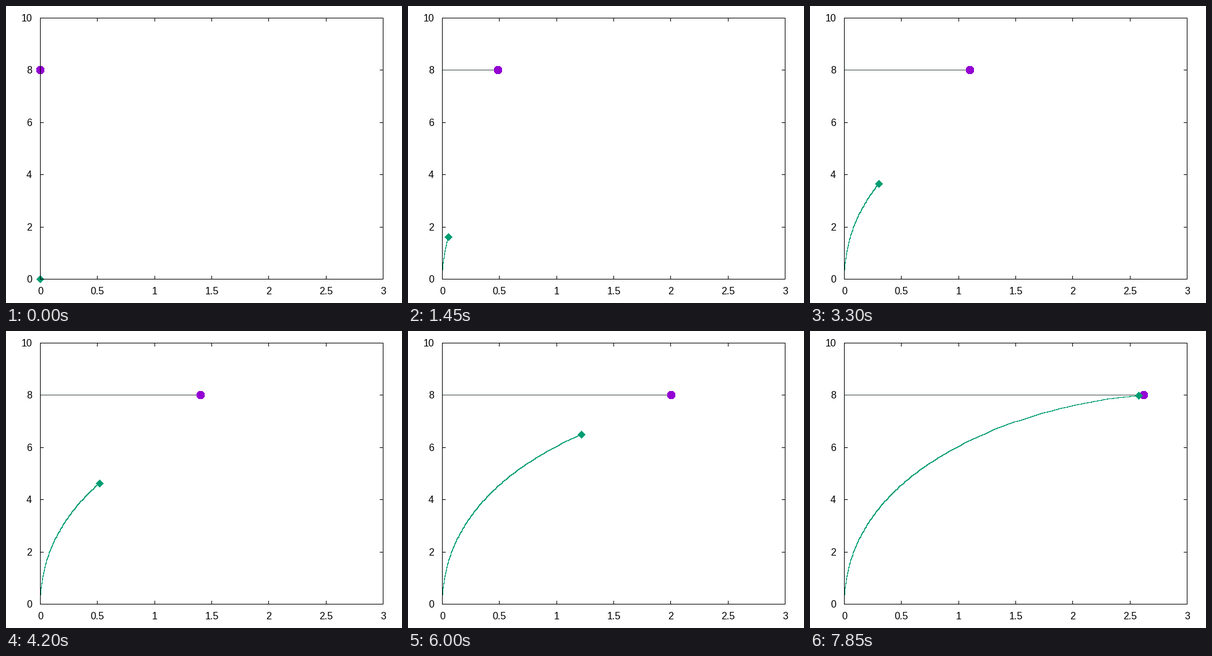
Animation, 640 px wide and 480 px high, one loop 7.9 s. Source, as a matplotlib script:

```python
import numpy as np
import matplotlib.pyplot as plt
from matplotlib.animation import FuncAnimation
from matplotlib.patches import Circle, Polygon, Rectangle

plt.rcParams["font.family"] = "Liberation Sans"
plt.rcParams["path.simplify"] = False

W, H, DPI = 640, 480, 100
PX = 72 / DPI  # one pixel in points
LEFT, RIGHT, TOP, BOTTOM = 55, 609, 19, 441
FRAMES, INTERVAL = 158, 50
PURPLE, GREEN, TRAIL = "#9400d3", "#009e73", "#3f5048"

HEIGHT = 8.0   # level of the runner
RATIO = 0.3    # runner speed / chaser speed


def to_px(x, y):
    """Data coordinates to whole pixels."""
    px = LEFT + np.floor(np.asarray(x) * (RIGHT - LEFT) / 3 + 0.5)
    py = BOTTOM - np.floor(np.asarray(y) * (BOTTOM - TOP) / 10 + 0.5)
    return px, py


def pursuit(t):
    """Closed-form pursuit curve; w is the remaining share of the height."""
    w = np.linspace(1, 0, 40001) ** 2
    a = w ** (1 + RATIO) / (1 + RATIO)
    b = w ** (1 - RATIO) / (1 - RATIO)
    x = HEIGHT * ((a - b) / 2 + RATIO / (1 - RATIO ** 2))
    time = RATIO * HEIGHT * (1 / (1 - RATIO ** 2) - (a + b) / 2)
    return np.interp(t, time, x), np.interp(t, time, HEIGHT * (1 - w))


def chain(px, py):
    """Pixel centres along a polyline of whole-pixel vertices."""
    xs, ys = [px[:1]], [py[:1]]
    for i in range(len(px) - 1):
        dx, dy = px[i + 1] - px[i], py[i + 1] - py[i]
        n = int(max(abs(dx), abs(dy)))
        if n:
            s = np.arange(1, n + 1) / n
            xs.append(np.floor(px[i] + dx * s + 0.5))
            ys.append(np.floor(py[i] + dy * s + 0.5))
    return np.concatenate(xs) + 0.5, np.concatenate(ys) + 0.5


fig = plt.figure(figsize=(W / DPI, H / DPI), dpi=DPI, facecolor="white")
ax = fig.add_axes([0, 0, 1, 1])
ax.set_xlim(0, W)
ax.set_ylim(H, 0)
ax.axis("off")


def line(xs, ys, color, z):
    return ax.plot(xs, ys, color=color, lw=PX, antialiased=False,
                   snap=False, zorder=z)[0]


def tick(x, y, dx, dy):
    line([x + 0.5, x + dx + 0.5], [y + 0.5, y + dy + 0.5], "black", 1)


def label(x, y, value, align):
    ax.text(x, y, f"{value:g}", ha=align, va="baseline", fontsize=16 * PX)


for v in np.arange(0, 3.1, 0.5):
    x = to_px(v, 0)[0]
    tick(x, BOTTOM, 0, -5)
    tick(x, TOP, 0, 5)
    label(x + 0.5, 466, v, "center")
for v in range(0, 11, 2):
    y = to_px(0, v)[1]
    tick(LEFT, y, 5, 0)
    tick(RIGHT, y, -5, 0)
    label(42, y + 6, v, "right")

ax.add_patch(Rectangle((LEFT + 0.5, TOP + 0.5), RIGHT - LEFT, BOTTOM - TOP,
                       fill=False, ec="black", lw=PX, antialiased=False,
                       snap=False, zorder=6))

times = (np.arange(FRAMES) + 0.1) / 60
run_x, run_y = to_px(times, np.full(FRAMES, HEIGHT))
chase_x, chase_y = to_px(*pursuit(times))

run_trail = line([], [], TRAIL, 2)
chase_trail = line([], [], GREEN, 3)
dot = ax.add_patch(Circle((0, 0), 6.3, fc=PURPLE, lw=0,
                          antialiased=False, zorder=4))
diamond = ax.add_patch(Polygon([(0, 0), (1, 0), (0, 1)], fc=GREEN, lw=0,
                               antialiased=False, snap=False, zorder=5))
CORNERS = 5.8 * np.array([(1, 0), (0, 1), (-1, 0), (0, -1)])


def update(i):
    n = i + 1
    run_trail.set_data(*chain(run_x[:n], run_y[:n]))
    chase_trail.set_data(*chain(chase_x[:n], chase_y[:n]))
    dot.center = run_x[i] + 0.5, run_y[i] + 0.5
    diamond.set_xy(CORNERS + (chase_x[i] + 0.5, chase_y[i] + 0.5))
    return run_trail, chase_trail, dot, diamond


anim = FuncAnimation(fig, update, frames=FRAMES, interval=INTERVAL,
                     repeat=True, repeat_delay=0, blit=False)
plt.show()
```
